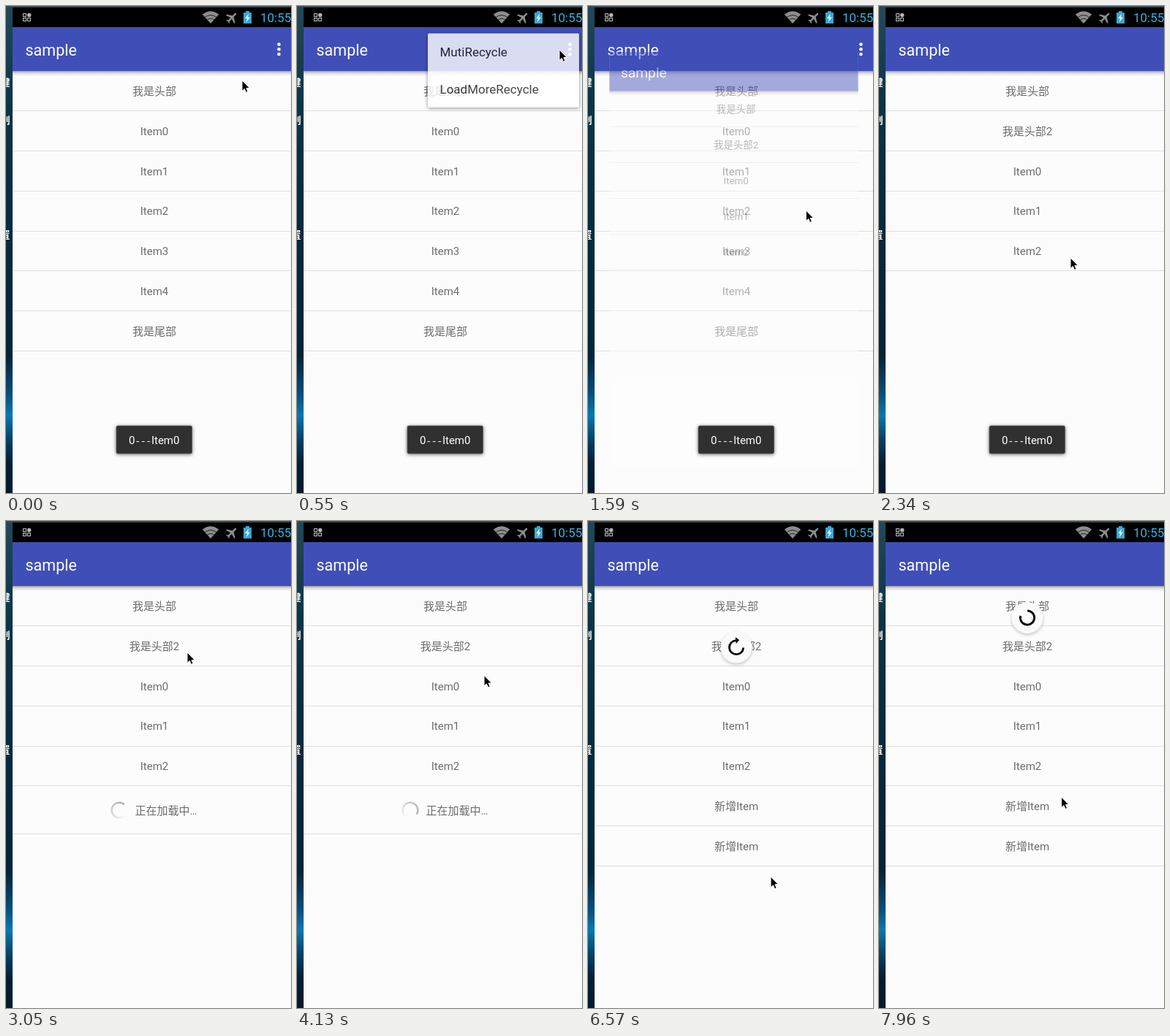
Animation, 390 px wide and 667 px high, one loop 7.99 s. Source, as an HTML page:

```html
<!DOCTYPE html>
<html lang="zh">
<head>
<meta charset="utf-8">
<title>sample</title>
<style>
  html, body { margin: 0; width: 100%; height: 100%; overflow: hidden; background: #000; }
  svg { display: block; width: 100vw; height: 100vh; }
  text { font-family: Roboto, "Noto Sans CJK SC", "Noto Sans CJK", sans-serif; white-space: pre; }
  .row { font-size: 15px; fill: #6c6c6c; }
  .mid { text-anchor: middle; }
  .menu { font-size: 17px; fill: #1c1c1c; }
  .desk { font-size: 13px; font-weight: 700; fill: #fff; text-anchor: end; }
  .drop { filter: drop-shadow(0 1px 2.5px rgba(0, 0, 0, .55)); }
  .soft { filter: drop-shadow(0 2px 2px rgba(0, 0, 0, .22)); }
</style>
</head>
<body>
<svg viewBox="0 0 390 667" preserveAspectRatio="none">
  <defs>
    <linearGradient id="wall" x2="0" y2="1">
      <stop offset="0" stop-color="#23485a"/>
      <stop offset=".2" stop-color="#0c3447"/>
      <stop offset=".45" stop-color="#062a3e"/>
      <stop offset=".72" stop-color="#032338"/>
      <stop offset=".8" stop-color="#06517d"/>
      <stop offset=".84" stop-color="#0879ac"/>
      <stop offset=".89" stop-color="#054164"/>
      <stop offset=".94" stop-color="#021e33"/>
      <stop offset="1" stop-color="#021a2b"/>
    </linearGradient>
    <linearGradient id="shade" x2="0" y2="1">
      <stop offset="0" stop-color="#000" stop-opacity=".36"/>
      <stop offset=".4" stop-color="#000" stop-opacity=".14"/>
      <stop offset="1" stop-color="#000" stop-opacity="0"/>
    </linearGradient>
    <clipPath id="window"><rect x="9" y="29" width="381" height="638"/></clipPath>
    <clipPath id="content"><rect x="9" y="89" width="381" height="578"/></clipPath>
  </defs>

  <rect width="390" height="667" fill="url(#wall)"/>
  <rect width="390" height="2" fill="#3a4c55"/>
  <text class="desk" x="5.5" y="109">键</text>
  <text class="desk" x="5.5" y="161">制</text>
  <text class="desk" x="5.5" y="318">置</text>

  <g id="status">
    <rect x="9" y="2" width="381" height="27"/>
    <g fill="none" stroke="#b4b4b4" stroke-width="1.1">
      <rect x="23.5" y="10.5" width="4" height="4"/>
      <rect x="23.5" y="16.5" width="4" height="4"/>
      <rect x="29.5" y="16.5" width="4" height="4"/>
      <circle cx="31.7" cy="12.4" r="2.2" fill="#b4b4b4"/>
    </g>
    <path d="M280 24L268.800 11.500Q280 3 291.200 11.500Z" fill="#8d8d8d"/>
    <path d="M272 15.500Q280 9.500 288 15.500M275.200 19Q280 15.300 284.800 19" fill="none" stroke="#222" stroke-width="1"/>
    <path transform="translate(309 16) rotate(45) scale(.84) translate(-11.500 -12)" fill="#8d8d8d"
      d="M21 16v-2l-8-5V3.500c0-.83-.67-1.500-1.500-1.500S10 2.670 10 3.500V9l-8 5v2l8-2.500V19l-2 1.500V22l3.500-1 3.500 1v-1.500L13 19v-5.500l8 2.500z"/>
    <path d="M328 7h5v2h3v15h-11V9h3z" fill="#3aa6d2"/>
    <path d="M332 10.500l-5 6.500h3l-1.500 5.500 5.500-7h-3z" fill="#e4f5fc"/>
    <text x="348" y="22" font-size="17" fill="#33b5e5">10:55</text>
  </g>

  <g clip-path="url(#window)">
    <g id="first"></g>
    <g id="second"></g>
  </g>

  <g id="toast">
    <rect class="drop" x="151" y="575" width="103.500" height="38" rx="2" fill="#303030" stroke="#5c5c5c" stroke-width=".8"/>
    <text class="mid" x="202.700" y="600" font-size="15" fill="#fff">0<tspan font-family="Noto Sans Mono, monospace" font-size="12.500">---</tspan>Item0</text>
  </g>

  <g id="menu">
    <rect class="drop" x="179" y="37.500" width="207" height="101.500" rx="1.500" fill="#fff"/>
    <text class="menu" x="195.500" y="69">MutiRecycle</text>
    <text class="menu" x="195.500" y="120">LoadMoreRecycle</text>
  </g>

  <path id="cursor" d="M0 0V14.500L3.300 11.400L5.500 16.400L8 15.300L5.900 10.500H10.400Z"
    stroke="#fff" stroke-width="1" stroke-linejoin="round"/>
</svg>
<script>
const LOOP = 7990;
const CX = 203, TOP = 89, PITCH = 54.85;
const $ = id => document.getElementById(id);

const clamp = x => Math.min(1, Math.max(0, x));
const span = (t, a, b) => clamp((t - a) / (b - a));
const smooth = x => x * x * (3 - 2 * x);
const easeOut = x => 1 - (1 - x) * (1 - x);
const show = (id, on) => $(id).setAttribute('visibility', on ? 'visible' : 'hidden');

const polar = (r, deg) => {
  const a = (deg - 90) * Math.PI / 180;
  return [r * Math.cos(a), r * Math.sin(a)];
};
const arc = (r, from, sweep) => {
  const [x0, y0] = polar(r, from), [x1, y1] = polar(r, from + sweep);
  return `M${x0} ${y0}A${r} ${r} 0 ${sweep > 180 ? 1 : 0} 1 ${x1} ${y1}`;
};

// Static markup
const line = y => `<rect x="9" y="${Math.round(y)}" width="381" height="1" fill="#dfdfdf"/>`;
const row = (label, i) =>
  `<text class="row mid" x="${CX}" y="${121.9 + i * PITCH}">${label}</text>` + line(143 + i * PITCH);
const rows = (labels, start = 0) => labels.map((s, i) => row(s, i + start)).join('');
const bar = `<rect x="9" y="29" width="381" height="60" fill="#3f4fb7"/>
  <rect x="9" y="${TOP}" width="381" height="7" fill="url(#shade)"/>
  <text x="26.500" y="68" font-size="21.500" fill="#fff">sample</text>`;
const page = '<rect x="9" y="29" width="381" height="638" fill="#fcfcfc"/>';
const dots = [52.5, 59.3, 66].map(y => `<circle cx="373.500" cy="${y}" r="2.300" fill="#fff"/>`).join('');

const SEGS = 24, ARC = 270;
const ring = Array.from({ length: SEGS }, (_, i) =>
  `<path d="${arc(10.3, -ARC + i * ARC / SEGS, ARC / SEGS + 1)}" stroke="#a9a9a9" stroke-opacity="${(i + 1) / SEGS}"/>`).join('');

$('first').innerHTML = page +
  rows(['我是头部', 'Item0', 'Item1', 'Item2', 'Item3', 'Item4', '我是尾部']) + bar + dots;

$('second').innerHTML = page +
  rows(['我是头部', '我是头部2', 'Item0', 'Item1', 'Item2']) +
  `<g id="loading">
    <g id="ring" fill="none" stroke-width="2.400">${ring}</g>
    <text class="row" x="176.500" y="401.500">正在加载中…</text>${line(428)}
  </g>
  <g id="added">${rows(['新增Item', '新增Item'], 5)}</g>${bar}
  <g clip-path="url(#content)"><g id="refresh">
    <circle class="soft" r="21.500" fill="#fafafa"/>
    <path id="sweep" fill="none" stroke="#000" stroke-width="2.800"/>
    <path id="arrow" d="M0 -5L5.500 0L0 5Z"/>
  </g></g>`;

// Pointer stops: time, x, y
const STOPS = [
  [0, 323, 102], [30, 323, 102], [230, 359, 60], [600, 359, 60], [1160, 304, 110],
  [1310, 304, 110], [1480, 307.5, 270], [1820, 271, 310], [2030, 271, 310],
  [2330, 262, 345], [2560, 262, 345], [3040, 248, 180], [3700, 248, 180],
  [4400, 260, 227], [5460, 260, 227], [6000, 250, 168], [6180, 250, 168],
  [6660, 250, 519], [6760, 250, 519], [6930, 250, 476], [6990, 250, 476],
  [7740, 249.5, 378], [LOOP, 249.5, 378]
];
function pointer(t) {
  const i = Math.max(1, STOPS.findIndex(s => s[0] > t));
  const [t0, x0, y0] = STOPS[i - 1], [t1, x1, y1] = STOPS[i];
  const p = smooth(span(t, t0, t1));
  return [x0 + (x1 - x0) * p, y0 + (y1 - y0) * p];
}

function drawMenu(t) {
  const leave = span(t, 1340, 1510);
  const alpha = t < 1340 ? span(t, 430, 580) : 1 - leave;
  const scale = t < 1340 ? 0.9 + 0.1 * easeOut(span(t, 430, 540)) : 1 - 0.081 * leave;
  show('menu', alpha > 0);
  $('menu').setAttribute('opacity', alpha);
  $('menu').setAttribute('transform', `translate(282.5 37) scale(${scale}) translate(-282.5 -37)`);
}

function drawSecond(t) {
  const p = easeOut(span(t, 1510, 1810));
  const s = 0.8 + 0.2 * p;
  show('second', p > 0);
  $('second').setAttribute('opacity', p);
  $('second').setAttribute('transform', `translate(199.5 348) scale(${s}) translate(-199.5 -348)`);
  $('loading').setAttribute('display', t >= 2890 && t < 5850 ? 'inline' : 'none');
  $('added').setAttribute('display', t >= 5850 ? 'inline' : 'none');
  $('ring').setAttribute('transform', `translate(155 396) rotate(${40 + (t - 3050) / 882 * 360})`);
}

function drawRefresh(t) {
  const on = t >= 6180;
  $('refresh').setAttribute('display', on ? 'inline' : 'none');
  if (!on) return;
  const pull = clamp((pointer(t)[1] - 168) / 351);
  const y = t < 6700
    ? 66 + 108 * easeOut(pull)
    : 174 - 41.5 * easeOut(span(t, 6700, 6900));
  $('refresh').setAttribute('transform', `translate(${CX} ${y})`);

  const dragging = t < 6700;
  let from, sweep;
  if (dragging) {
    from = -90 + 200 * pull;
    sweep = 10 + 278 * pull;
  } else {
    // Arc grows for half a cycle, then its tail catches up.
    const cycles = (t - 7960) / 1333 + 0.5;
    const p = cycles - Math.floor(cycles);
    const head = smooth(clamp(p * 2)), tail = smooth(clamp(p * 2 - 1));
    from = 270 * tail + 216 * (cycles - 0.5) + 270 * Math.floor(cycles);
    sweep = 15 + 270 * (head - tail);
  }
  $('sweep').setAttribute('d', arc(9.6, from, sweep));
  const alpha = dragging ? 0.3 + 0.7 * smooth(pull) : 1;
  $('sweep').setAttribute('opacity', alpha);
  $('arrow').setAttribute('opacity', dragging ? alpha : 0);
  const [ax, ay] = polar(9.6, from + sweep);
  $('arrow').setAttribute('transform', `translate(${ax} ${ay}) rotate(${from + sweep}) scale(${pull})`);
}

function draw(t) {
  drawMenu(t);
  drawSecond(t);
  drawRefresh(t);
  const toast = 1 - span(t, 2480, 2930);
  show('toast', toast > 0);
  $('toast').setAttribute('opacity', toast);
  $('cursor').setAttribute('transform', `translate(${pointer(t)})`);
}

const begin = performance.now();
function tick() {
  draw((performance.now() - begin) % LOOP);
  requestAnimationFrame(tick);
}
tick();
</script>
</body>
</html>
```
